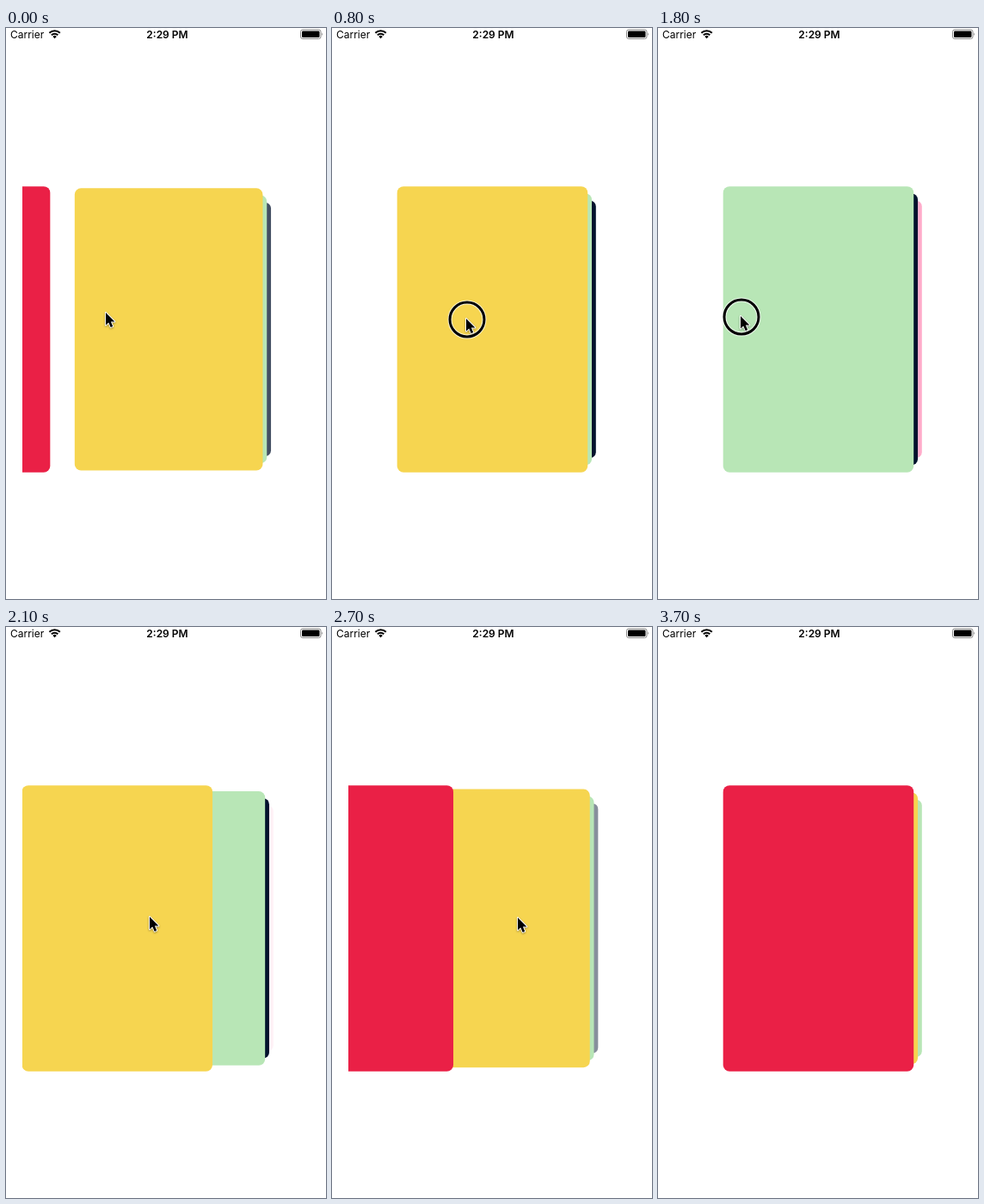
An HTML page for the animation above (3900 ms loop, 372x664 px).

```html
<!DOCTYPE html>
<html lang="en">
<head>
<meta charset="utf-8">
<title>Card stack</title>
<style>
  html, body { margin: 0; width: 100%; height: 100%; overflow: hidden; background: #fff; }
  svg { display: block; }
  text { font: 12px Inter, sans-serif; }
</style>
</head>
<body>
<svg width="372" height="664" viewBox="0 0 372 664">
  <clipPath id="deckClip"><rect x="19" y="0" width="353" height="664"/></clipPath>

  <text x="5" y="11.5">Carrier</text>
  <g fill="none" stroke="#000" stroke-width="2">
    <path d="M50.4 5.8a8.8 8.8 0 0 1 12.4 0"/>
    <path d="M52.9 8.3a5.2 5.2 0 0 1 7.4 0"/>
  </g>
  <path d="M54.4 9.9a3.1 3.1 0 0 1 4.4 0L56.6 12.2z"/>
  <text x="187.5" y="11.5" text-anchor="middle" style="font-weight:600">2:29 PM</text>
  <rect x="342.5" y="2" width="23.5" height="10.5" rx="2.4" fill="none" stroke="#888"/>
  <rect x="344" y="3.5" width="20.5" height="7.5" rx="1.2"/>
  <path d="M367.2 5.3q1.7 1.9 0 3.8z" fill="#777"/>

  <g id="deck" clip-path="url(#deckClip)"></g>

  <g id="pointer">
    <g id="ring" fill="none">
      <circle cx="1" cy="1" r="20" stroke="#fff" stroke-opacity=".75" stroke-width="5"/>
      <circle cx="1" cy="1" r="20" stroke="#000" stroke-width="3"/>
    </g>
    <path d="M0 0V14.5L3.3 11.4 5.7 17 8.2 15.9 5.9 10.5H10.4z"
      stroke="#fff" stroke-width="1.8" paint-order="stroke" stroke-linejoin="round"
      style="filter:drop-shadow(0 1px 1px rgba(0,0,0,.35))"/>
  </g>
</svg>
<script>
const LOOP = 3900, STEP = 100;
const WIDTH = 221.5, HEIGHT = 332.5, RIGHT = 297.2, MIDDLE = 350.4;
const PEEK = 4.8, SHRINK = 0.05, TRAVEL = WIDTH * 1.5;
const SETTLE = 95;
const COLORS = ["#ea2046", "#f6d550", "#b8e6b6", "#02122d", "#ffaccb"];

// Each swipe starts at `press`; at time `mark` the fraction `left` remains.
const SWIPES = [
  { press: -200, mark: 0, left: 0.26, from: 0, to: 1 },
  { press: 800, mark: 1000, left: 0.325, from: 1, to: 2 },
  { press: 1800, mark: 2100, left: 0.172, from: 2, to: 1 },
  { press: 2400, mark: 2700, left: 0.47, from: 1, to: 0 }
];

// Pointer tip: time, x, y
const PATH = [
  [0, 116, 331], [600, 156, 338], [800, 156, 338], [1000, 96, 336],
  [1300, 96, 335], [1800, 96, 335], [2100, 167, 337], [2400, 167, 337],
  [2700, 216, 338], [2900, 216, 338], [3000, 160, 245], [3100, 71, 133]
];
const POINTER_END = 3200;

const byId = id => document.getElementById(id);
const clamp = v => Math.max(0, Math.min(1, v));

const cards = COLORS.map(color => {
  const card = document.createElementNS("http://www.w3.org/2000/svg", "rect");
  card.setAttribute("fill", color);
  byId("deck").prepend(card);
  return card;
});

function setAll(node, attributes) {
  for (const name in attributes) node.setAttribute(name, attributes[name]);
}

function pointerAt(time) {
  const next = PATH.findIndex(point => point[0] > time);
  if (next < 0) return PATH[PATH.length - 1].slice(1);
  const [t0, x0, y0] = PATH[Math.max(0, next - 1)];
  const [t1, x1, y1] = PATH[next];
  const k = clamp((time - t0) / (t1 - t0));
  return [x0 + (x1 - x0) * k, y0 + (y1 - y0) * k];
}

// The card follows the finger, then the release settles exponentially.
function positionAt(time, swipe) {
  const drag = Math.abs(pointerAt(time)[0] - pointerAt(swipe.press)[0]);
  const settling = swipe.left * Math.exp((swipe.mark - time) / SETTLE);
  let remaining = Math.min(1 - drag / TRAVEL, settling);
  if (time === swipe.press) remaining = 1;
  if (remaining < 0.003) remaining = 0;
  return swipe.to + (swipe.from - swipe.to) * remaining;
}

function placeCard(card, depth) {
  const behind = Math.max(0, depth);
  const scale = 1 - SHRINK * behind;
  const right = RIGHT + (depth < 0 ? TRAVEL : PEEK) * depth;
  setAll(card, {
    x: right - WIDTH * scale,
    y: MIDDLE - HEIGHT * scale / 2,
    width: WIDTH * scale,
    height: HEIGHT * scale,
    rx: 7.5 * scale,
    opacity: clamp(3 - depth)
  });
}

function draw(time) {
  const swipe = SWIPES.filter(s => s.press <= time).pop();
  const position = positionAt(time, swipe);
  cards.forEach((card, i) => placeCard(card, i - position));

  setAll(byId("pointer"), {
    transform: `translate(${pointerAt(time)})`,
    visibility: time < POINTER_END ? "visible" : "hidden"
  });
  byId("ring").setAttribute("display", time < swipe.press + 200 ? "inline" : "none");
}

const start = performance.now();
function tick() {
  const time = (performance.now() - start) % LOOP;
  draw(Math.floor(time / STEP) * STEP);
  requestAnimationFrame(tick);
}
tick();
</script>
</body>
</html>
```
